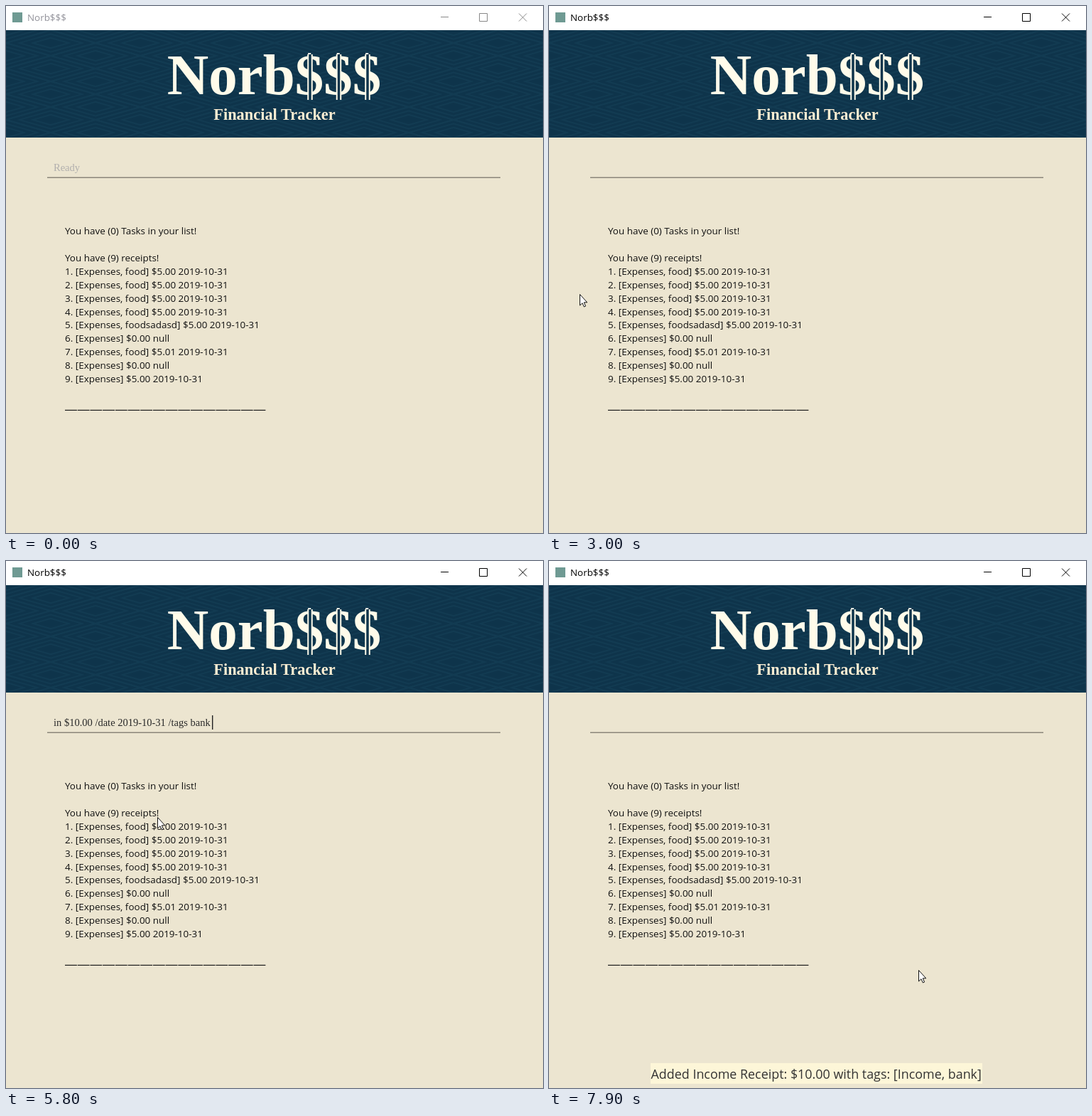
Recreate the animation shown at these times as an HTML page. Size 756x741 px, loop 8000 ms.

```html
<!DOCTYPE html>
<html lang="en">
<head>
<meta charset="utf-8">
<title>Norb$$$</title>
<style>
  html, body { margin: 0; width: 100%; height: 100%; overflow: hidden; background: #ece5d0; }
  svg { display: block; width: 100%; height: 100%; }
  text { font-family: "Open Sans", sans-serif; white-space: pre; }
  .serif { font-family: "Liberation Serif", serif; }
  .heading { font-weight: bold; text-anchor: middle; }
</style>
</head>
<body>
<svg viewBox="0 0 756 741">
  <defs>
    <pattern id="waves" width="126" height="36" y="34" patternUnits="userSpaceOnUse">
      <g id="diamonds" fill="none" stroke="#123b52" stroke-width="1.8"></g>
    </pattern>
  </defs>

  <rect width="756" height="741" fill="#ece5d0"/>
  <rect width="756" height="34" fill="#fff"/>
  <rect x="9" y="9" width="14" height="14" fill="#6f9a93"/>
  <text id="caption" x="30" y="21" font-size="13.4">Norb$$$</text>
  <path id="buttons" d="M612 15.5H623M666.5 10.5H677.5V21.5H666.5ZM722 10.5L733 21.5M733 10.5L722 21.5" fill="none"/>

  <rect y="34" width="756" height="151" fill="#0e344b"/>
  <rect y="34" width="756" height="151" fill="url(#waves)"/>
  <text class="serif heading" x="377.5" y="124" font-size="81" fill="#fffbea">Norb$$$</text>
  <g id="bars"></g>
  <text class="serif heading" x="378" y="160" font-size="22.4" fill="#fdeed3">Financial Tracker</text>

  <rect x="58" y="240.5" width="638" height="1.5" fill="#8b867a"/>
  <text id="field" class="serif" x="67" y="231.5" font-size="14.5"></text>
  <rect id="caret" y="217" width="1.4" height="20" fill="#222"/>

  <g id="list" font-size="13.45" fill="#111"></g>
  <path d="M83 568.4H366" stroke="#222" stroke-width="1.2" stroke-dasharray="16.9 .8"/>

  <g id="toast">
    <rect x="143" y="706" width="467" height="29" fill="#fdf6d8"/>
    <text x="143.5" y="728" font-size="17.9" fill="#333">Added Income Receipt: $10.00 with tags: [Income, bank]</text>
  </g>

  <path id="arrow" d="M.5.5V16L4 12.7 6.4 18 8.6 17 6.3 11.8H10.8Z" fill="#fff" stroke="#111"/>
  <path id="beam" d="M-3.5-7H-1L0-6 1-7H3.5M0-6V6M-3.5 7H-1L0 6 1 7H3.5" fill="none" stroke="#fbf8ef"/>
</svg>
<script>
const LOOP = 8000, STEP = 100, BLINK = 500, GLIDE = 300;
const FOCUS = 2100, ACTIVE = 2300, PASTE = 4400, ENTER = 7400;
const COMMAND = "in $10.00 /date 2019-10-31 /tags bank";

// Pointer stops: arrival time, x, y. Each glide takes at most GLIDE ms.
const stops = [
  [300, 325, 140], [600, 262, 230], [900, 180, 290], [1100, 131, 243], [1400, 121, 239],
  [1900, 124, 224], [2600, 105, 642], [3000, 43, 405], [3300, 258, 217], [3800, 266, 224],
  [5400, 374, 327], [5700, 250, 363], [6000, 106, 350], [6300, 162, 355], [6600, 400, 394],
  [7000, 417, 314], [7900, 520, 575]
];

const $ = id => document.getElementById(id);
const show = (id, visible) => $(id).setAttribute("visibility", visible ? "visible" : "hidden");

function add(parent, tag, attributes, text = "") {
  const node = document.createElementNS("http://www.w3.org/2000/svg", tag);
  for (const name in attributes) node.setAttribute(name, attributes[name]);
  node.textContent = text;
  $(parent).append(node);
}

function buildHeader() {
  // Nested diamonds, repeated at the tile sides so that they interlock
  for (const [cx, cy] of [[63, 18], [0, 0], [126, 0], [0, 36], [126, 36]])
    for (const k of [1, 0.7, 0.4])
      add("diamonds", "path", { d: `M${cx - 63 * k} ${cy}l${63 * k} ${-18 * k} ${63 * k} ${18 * k} ${-63 * k} ${18 * k}Z` });

  // Double stroke through each dollar sign
  for (let i = 0; i < 3; i++)
    for (const [width, stroke] of [[7.5, "#fffbea"], [3.5, "#0e344b"]])
      add("bars", "path", { d: `M${428 + 40.5 * i} 68V132`, stroke, "stroke-width": width });
}

function buildList() {
  const receipt = (tag = ", food", amount = "5.00", date = "2019-10-31") => `[Expenses${tag}] $${amount} ${date}`;
  const empty = receipt("", "0.00", "null");
  const receipts = [
    ...Array(4).fill(receipt()), receipt(", foodsadasd"), empty, receipt(", food", "5.01"), empty, receipt("")
  ];
  const lines = [
    "You have (0) Tasks in your list!", "", `You have (${receipts.length}) receipts!`,
    ...receipts.map((text, i) => `${i + 1}. ${text}`)
  ];
  lines.forEach((line, i) => add("list", "text", { x: 83, y: Math.round(321.4 + 18.85 * i) }, line));
}

function pointerAt(t) {
  const next = stops.findIndex(([time]) => time > t);
  if (next < 0) return stops.at(-1).slice(1);
  const [t0, x0, y0] = stops[next - 1], [t1, x1, y1] = stops[next];
  const begin = Math.max(t0, t1 - GLIDE);
  const k = Math.max(0, (t - begin) / (t1 - begin));
  const eased = k * k * (3 - 2 * k);
  return [x0 + (x1 - x0) * eased, y0 + (y1 - y0) * eased];
}

function drawPointer(t) {
  const visible = t >= stops[0][0];
  const [x, y] = visible ? pointerAt(t) : [0, 0];
  const overField = x > 58 && x < 696 && y > 211 && y < 242;
  show("arrow", visible && !overField);
  show("beam", visible && overField);
  const place = `translate(${Math.round(x)} ${Math.round(y)})`;
  $("arrow").setAttribute("transform", place);
  $("beam").setAttribute("transform", place + " translate(.5 .5)");
}

function drawCaret(t, filled) {
  const start = t >= ENTER ? ENTER : filled ? PASTE + 300 : ACTIVE;
  $("caret").setAttribute("x", filled ? 290 : 66.5);
  show("caret", t >= ACTIVE && Math.floor((t - start) / BLINK) % 2 === 0);
}

function render(now) {
  const t = Math.floor(now % LOOP / STEP) * STEP;
  const active = t >= ACTIVE, filled = t >= PASTE && t < ENTER;

  $("caption").setAttribute("fill", active ? "#000" : "#92929a");
  $("buttons").setAttribute("stroke", active ? "#000" : "#888");
  $("field").textContent = t < FOCUS ? "Ready" : filled ? COMMAND : "";
  $("field").setAttribute("fill", t < FOCUS ? "#b1afad" : "#2a2a2a");
  show("toast", t >= ENTER);
  drawCaret(t, filled);
  drawPointer(t);
}

buildHeader();
buildList();
const start = performance.now();
function tick() {
  render(performance.now() - start);
  requestAnimationFrame(tick);
}
tick();
</script>
</body>
</html>
```
